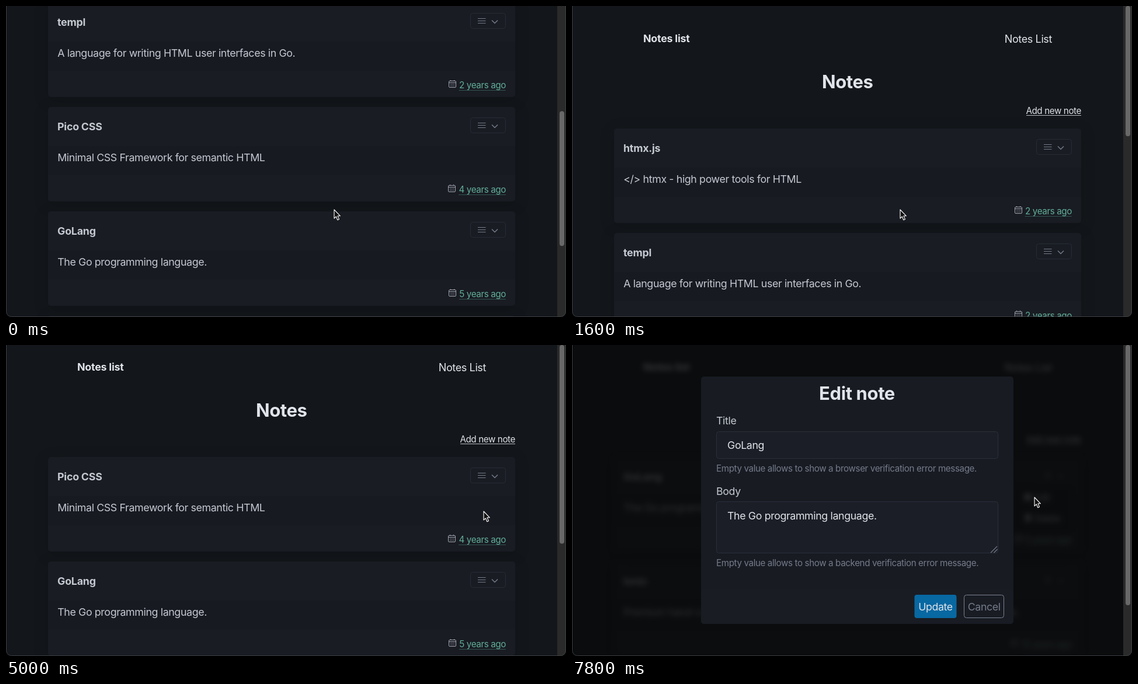
Animation of 959x533 px, one loop 8000 ms. Source, as an HTML page:

```html
<!DOCTYPE html>
<html lang="en">
<head>
<meta charset="utf-8">
<title>Notes</title>
<style>
  html, body { margin: 0; width: 100%; height: 100%; overflow: hidden; background: #000; }
  svg { display: block; width: 959px; height: 533px; }
  text { font-family: Inter, "Open Sans", sans-serif; letter-spacing: -.0212em; fill: #c5c9d1; white-space: pre; }
  .small { letter-spacing: -.026em; }
  .bold { font-weight: 700; letter-spacing: -.012em; }
  .light { fill: #e1e4ea; }
  .age { fill: #62af9a; }
  .help { fill: #747b8a; }
  .line { fill: none; stroke: #757b88; stroke-width: 1.1; }
  .field { fill: #1b1e26; stroke: #2a2f3b; }
  .shadow { filter: drop-shadow(0 5px 12px rgba(0, 0, 0, .16)); }
  .blurred { filter: blur(5px) grayscale(.6); }
</style>
</head>
<body>
<svg viewBox="0 0 959 533"></svg>
<script>
const LOOP = 8000, STEP = 200, PITCH = 179;
const BASE = 17.8, SMALL = 15.2, HEADING = 31;

const notes = [
  ['htmx.js', '</> htmx - high power tools for HTML', '2 years ago'],
  ['templ', 'A language for writing HTML user interfaces in Go.', '2 years ago'],
  ['Pico CSS', 'Minimal CSS Framework for semantic HTML', '4 years ago'],
  ['GoLang', 'The Go programming language.', '5 years ago'],
  ['Ionic', 'Premium hand-crafted icons built by Ionic, for Ionic apps and web apps everywhere.', '10 years ago'],
];

// [time, scroll offset]
const scrollKeys = [[0, 377], [200, 560], [400, 581], [800, 581], [1000, 300], [1200, -79.5],
  [1400, -45], [1600, -18], [1800, -5], [2000, 0]];

// [time, x, y] of the pointer's hot spot
const pointerKeys = [[0, 562, 349], [1600, 562, 349], [2000, 790, 262], [2400, 838, 230],
  [2600, 839, 228], [2800, 839, 228], [3200, 817, 291], [3400, 817, 291], [4000, 839, 233],
  [4200, 839, 233], [4600, 817, 291], [4800, 817, 291], [5000, 818, 285], [5200, 818, 285],
  [5600, 839, 231], [5800, 839, 229], [6200, 817, 291], [6400, 817, 291], [7000, 839, 229],
  [7200, 839, 229], [7600, 794, 262], [7800, 792, 261]];

const openTimes = [2800, 4200, 5800, 7200];
const deleteTimes = [3400, 4800, 6400];
const dialogTime = 7800;

// y is the middle of the capitals
const text = (x, y, s, size = BASE, cls = '', anchor = 'start') =>
  `<text x="${x}" y="${y + size * .364}" font-size="${size}" text-anchor="${anchor}"
    class="${cls}${size === SMALL ? ' small' : ''}">${s.replace(/</g, '&lt;').replace(/>/g, '&gt;')}</text>`;

const rect = (x, y, w, h, fill, r = 0, more = '') =>
  `<rect x="${x}" y="${y}" width="${w}" height="${h}" rx="${r}" fill="${fill}" ${more}/>`;

const calendar = `<g class="line" style="stroke:#a0a4ae;stroke-width:1">
  <rect x=".5" y="1.5" width="12" height="11" rx="1.5"/>
  <path d="M.5 4.5h12M3.5 0v2M9.5 0v2"/>
  <path d="M3 7.2h8M3 10h8" stroke-dasharray="1.3 1.2"/></g>`;

const card = ([title, body, age]) => `<g class="card">
  ${rect(72, 0, 800, 162, '#191c23', 5, 'class="shadow"')}
  ${rect(72, 67, 800, 50, '#181a22')}
  ${text(88, 34, title, BASE, 'bold')}
  ${text(88.2, 87, body)}
  ${rect(795.5, 18.5, 60, 26, 'none', 4, 'stroke="#272b35"')}
  <path class="line" d="M808 27.5h13.5M808 31.5h13.5M808 35.5h13.5"/>
  <path class="line" style="stroke-width:1.5" d="M832 30.5l5 5 5-5"/>
  <g class="date">${text(856, 141.5, age, SMALL, 'age', 'end')}
    <path stroke="#4f907f" stroke-dasharray="1 1"/><g class="icon">${calendar}</g></g>
</g>`;

const menu = `<g id="menu">
  ${rect(755, 241, 100, 81, '#13161b', 4)}
  ${rect(756, 247, 99, 30, '#1a1f28', 0, 'id="hover"')}
  <path d="M777 255h7l-5 6v3h3l5-6v6q0 2-2 2h-8q-2 0-2-2v-7q0-2 2-2z" fill="#c5c9d1"/>
  <path d="M781 262l5.5-7" stroke="#c5c9d1" stroke-width="2"/>
  ${text(792.5, 261.5, 'Edit', SMALL)}
  <path d="M775 291h12v1.6h-12zM779 289.5h4v1.5h-4zM776 293.5h10l-.8 9h-8.4z" fill="#c5c9d1"/>
  <path d="M779.3 295v6M781 295v6M782.7 295v6" stroke="#13161b" stroke-width=".8"/>
  ${text(792.5, 297.5, 'Delete', SMALL)}
</g>`;

const help = side => `Empty value allows to show a ${side} verification error message.`;

const dialog = `<g id="dialog">
  ${rect(0, 0, 944, 533, '#08090a', 0, 'opacity=".8"')}
  ${rect(221, 54, 535, 424, '#181b22', 5)}
  ${rect(221, 418, 535, 60, '#191c23', 5)}
  ${text(488, 83, 'Edit note', HEADING, 'bold light', 'middle')}
  ${text(247, 130, 'Title')}
  <rect class="field" x="247.5" y="148.5" width="482" height="46" rx="4"/>
  ${text(266, 172, 'GoLang', BASE, 'light')}
  ${text(247, 211, help('browser'), SMALL, 'help')}
  ${text(247, 251, 'Body')}
  <rect class="field" x="247.5" y="268.5" width="482" height="88" rx="4"/>
  ${text(266, 293, 'The Go programming language.', BASE, 'light')}
  <path class="line" d="M717 356l11-11M722.5 356l6-6"/>
  ${text(247, 373.5, help('backend'), SMALL, 'help')}
  ${rect(586.5, 428, 72, 40, '#0868a2', 4)}
  ${text(622.5, 449, 'Update', BASE, 'light', 'middle')}
  ${rect(671.5, 428.5, 68, 39, 'none', 4, 'stroke="#7b8393"')}
  ${text(705.7, 449, 'Cancel', BASE, 'help', 'middle')}
</g>`;

const beam = 'M-3.5-8.5q3 0 3.5 2 .5-2 3.5-2M0-6.5v13M-3.5 8.5q3 0 3.5-2 .5 2 3.5 2M-2 2.5h4';

const pointers = `<g id="pointer" stroke-linejoin="round" stroke-linecap="round">
  <path id="arrow" d="M0 0v15l3.3-3.2 2.5 5.9 2.7-1.1-2.5-5.8h4.4z" fill="#111" stroke="#fff" stroke-width="1.1"/>
  <g id="hand"><path d="M-1.5 1.5q0-1.700 1.3-1.700t1.4 1.700v4.500q.3-1 1.500-1t1.500 1.200q.4-.7 1.400-.6t1.400 1.300q.4-.5 1.200-.3 1.300.3 1.300 2v3.500q0 1.500-1 3v2h-7.500v-1.500l-5-6q-1-1.500.2-2.200t2.400.6l.9 1z"
    fill="#fff" stroke="#111"/>
    <path d="M2.500 11v3M4.700 11v3M6.800 11v3" stroke="#111"/></g>
  <g id="beam" fill="none"><path d="${beam}" stroke="#fff" stroke-width="3"/>
    <path d="${beam}" stroke="#111"/></g>
</g>`;

document.querySelector('svg').innerHTML = `
  <clipPath id="window"><rect y="-20" width="959" height="553" rx="9"/></clipPath>
  <g clip-path="url(#window)">
    ${rect(0, 0, 959, 533, '#13171b')}
    <g id="view">
      <g id="page">
        ${text(122, 38, 'Notes list', BASE, 'bold light')}
        ${text(822, 38, 'Notes List', 18, 'light', 'end')}
        ${text(471.8, 111.5, 'Notes', HEADING, 'bold light', 'middle')}
        ${text(872, 161.5, 'Add new note', SMALL, 'light', 'end')}
        <path d="M778 169.5h94" stroke="#b9bdc5"/>
        ${notes.map(card).join('')}
      </g>
      <rect id="focus" x="795.5" y="210.5" width="60" height="27" rx="4" fill="none"/>
      ${menu}
    </g>
    ${dialog}
    ${rect(944, 0, 15, 533, '#2a2a2a')}
    <rect id="thumb" x="948" width="8" rx="4" fill="#686868"/>
    <rect x=".5" y="-20" width="958" height="552.5" rx="9" fill="none" stroke="#3b3e41"/>
  </g>
  ${pointers}`;

const $ = id => document.getElementById(id);
const show = (el, on) => el.style.display = on ? '' : 'none';
const cards = [...document.querySelectorAll('.card')];

for (const date of document.querySelectorAll('.date')) {
  const left = 856 - date.querySelector('text').getComputedTextLength();
  date.querySelector('path').setAttribute('d', `M${left} 150.5H856`);
  date.querySelector('.icon').setAttribute('transform', `translate(${Math.round(left - 18.5)} 133)`);
}

function at(keys, t) {
  const i = keys.findIndex(k => k[0] > t);
  if (i < 0) return keys[keys.length - 1].slice(1);
  const a = keys[i - 1], b = keys[i], p = (t - a[0]) / (b[0] - a[0]);
  return a.slice(1).map((v, n) => v + (b[n + 1] - v) * p);
}

function draw(t) {
  const [scroll] = at(scrollKeys, t);
  const [x, y] = at(pointerKeys, t);
  const gone = deleteTimes.filter(d => t >= d).length;
  const open = t >= openTimes[gone];
  const leaving = t + STEP === deleteTimes[gone];
  const editing = t >= dialogTime;

  $('page').setAttribute('transform', `translate(0 ${-scroll})`);
  cards.forEach((c, i) => {
    show(c, i >= gone);
    c.setAttribute('transform', `translate(0 ${192 + (i - gone) * PITCH})`);
  });

  $('thumb').setAttribute('y', Math.max(0, scroll) * .478);
  $('thumb').setAttribute('height', 257400 / (1114 - PITCH * gone) + Math.min(0, scroll) * .44);

  show($('menu'), open);
  show($('hover'), y > 247 && !editing);
  $('hover').setAttribute('y', y > 280 ? 283 : 247);
  show($('focus'), open && !editing);
  $('focus').setAttribute('stroke', leaving ? '#124a68' : '#0570a9');
  $('focus').setAttribute('stroke-width', leaving ? 1.3 : 2);

  show($('dialog'), editing);
  $('view').setAttribute('class', editing ? 'blurred' : '');

  const onButton = x > 795 && x < 856 && y > 210 && y < 239;
  const kind = editing ? 'arrow' : onButton ? 'hand' : open && y > 241 ? 'beam' : 'arrow';
  for (const k of ['arrow', 'hand', 'beam']) show($(k), k === kind);
  $('pointer').setAttribute('transform', `translate(${x} ${y})`);
}

function tick(now) {
  draw(Math.floor(now % LOOP / STEP) * STEP);
  requestAnimationFrame(tick);
}
draw(0);
requestAnimationFrame(tick);
</script>
</body>
</html>
```
